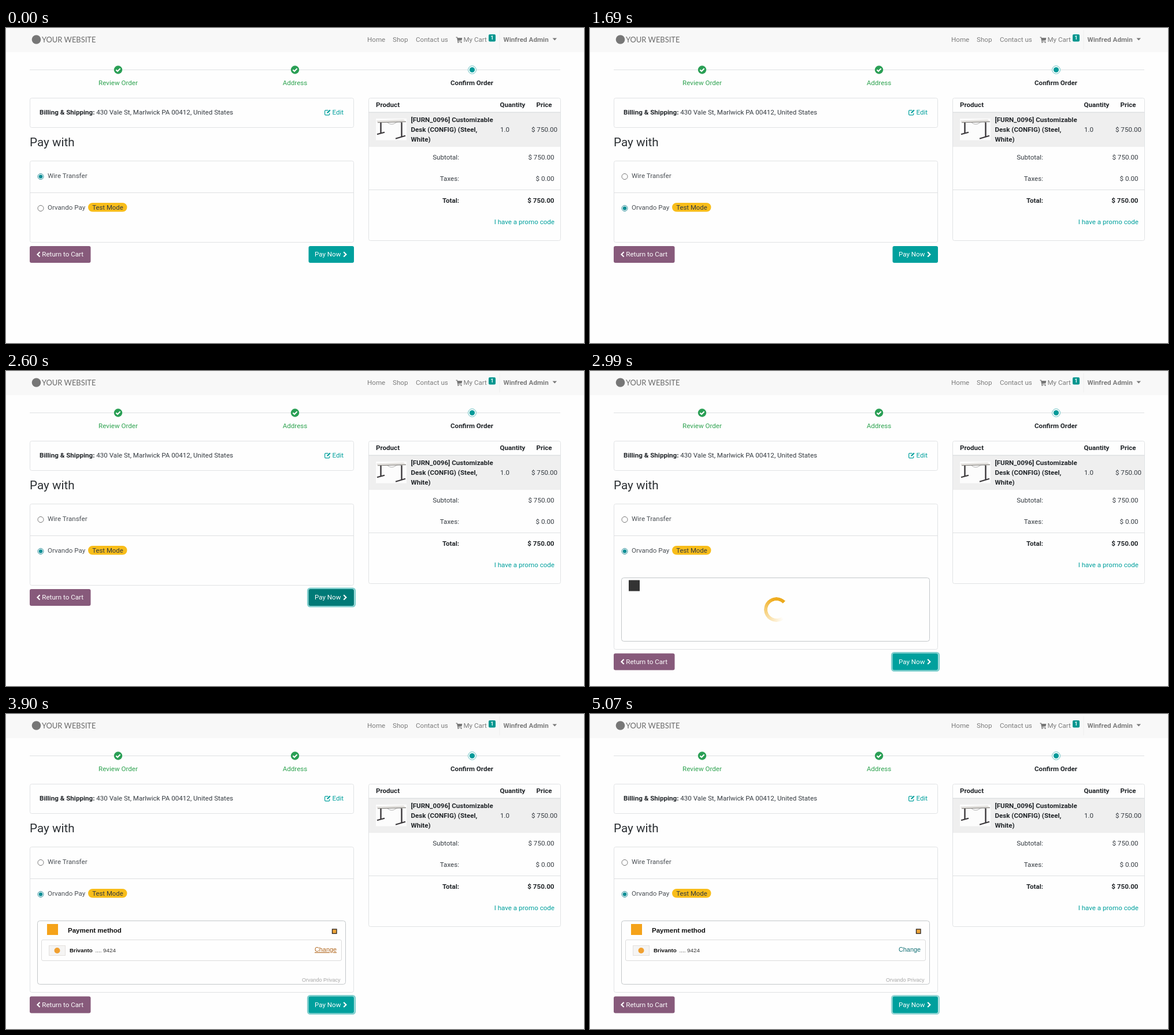
Animation, 1000 px wide and 546 px high, one loop 5.2 s. Source, as an HTML page:

```html
<!DOCTYPE html>
<html lang="en">
<head>
<meta charset="utf-8">
<title>Checkout</title>
<style>
  html, body { margin: 0; width: 100%; height: 100%; overflow: hidden; background: #fefefe; }
  svg { position: absolute; left: 0; top: 0; display: block; }
  text { font: 11.6px Roboto, sans-serif; fill: #343a40; white-space: pre; }
  .b { font-weight: 700; fill: #212529; }
  .nav text { fill: #7c7c7c; }
  .nav .user { font-weight: 700; font-size: 11.7px; }
  .nav .brand { font: 12.9px Lato, sans-serif; fill: #6a6a6a; }
  .nav .count { font-size: 8.6px; font-weight: 700; fill: #fff; }
  .mid { text-anchor: middle; }
  .end { text-anchor: end; }
  .teal { fill: #00a09d; }
  .done { fill: #2ea350; }
  .method { fill: #4a4f54; }
  .white { fill: #fff; }
  .title { font-size: 20.7px; fill: #2b2f33; }
  .card { fill: #fefefe; stroke: #e0e2e4; }
  .rule { stroke: #dee0e2; fill: none; }
  .wallet text { font: 9.8px "Liberation Sans", Arial, sans-serif; fill: #333; }
  .wallet .head { font-size: 11.54px; font-weight: 700; fill: #111; }
  .wallet .name { font-weight: 700; fill: #111; }
  .wallet .note { font-size: 9px; fill: #a6a6a6; }
  .wallet .link { font-size: 10.85px; fill: #127075; }
  .wallet .link.hover { fill: #b0651c; text-decoration: underline; }
  .radio circle { fill: #fff; stroke: #767676; }
  .radio .dot { display: none; stroke: none; fill: #0b8d94; }
  .radio.on circle:first-child { stroke: #2b8d99; }
  .radio.on .dot { display: block; }
  .off { display: none; }
  #spin {
    width: 43px; height: 43px; border-radius: 50%;
    background: conic-gradient(from var(--a), transparent 0 27%, #fdf1d8 36%, #f6cf78 62%, #f0ad20 82%, #eba91c);
    -webkit-mask: radial-gradient(circle, transparent 15.2px, #000 15.8px);
    mask: radial-gradient(circle, transparent 15.2px, #000 15.8px);
  }
</style>
</head>
<body>
<svg width="1000" height="546" viewBox="0 0 1000 546">
  <defs>
    <g id="tick">
      <circle r="7.2" fill="#2a9f55"/>
      <path d="M-3.6 0 L-1 2.6 L3.6 -2.2" fill="none" stroke="#fff" stroke-width="2.1"/>
    </g>
  </defs>

  <g class="nav">
    <rect width="1000" height="41.5" fill="#f8f8f8"/>
    <circle cx="52.5" cy="20" r="7.8" fill="#777"/>
    <text class="brand" x="62" y="24.6">YOUR WEBSITE</text>
    <text x="625" y="24">Home</text>
    <text x="669" y="24">Shop</text>
    <text x="709" y="24">Contact us</text>
    <g fill="#777">
      <path d="M778.5 15.5 h2.4 l.4 1.4 h8 l-.8 4.6 -6.4 .7 .2 1 h6.2 v1.1 h-7.3 l.1-1.2 -1.3-6.4 h-1.5z"/>
      <circle cx="782.3" cy="25" r="1"/><circle cx="787.6" cy="25" r="1"/>
    </g>
    <text x="791.5" y="24">My Cart</text>
    <rect x="835" y="11" width="12" height="12.5" rx="2" fill="#00968f"/>
    <text class="count mid" x="841" y="20.3">1</text>
    <path class="rule" d="M854 4 V37" style="stroke:#eee"/>
    <text class="user" x="860.5" y="24">Winfred Admin</text>
    <path d="M945.5 17.5 h7.5 l-3.75 3.9z" fill="#777"/>
  </g>

  <path class="rule" d="M41 72.5 H959"/>
  <use href="#tick" x="194" y="72.5"/>
  <use href="#tick" x="500" y="72.5"/>
  <circle cx="806.5" cy="72.5" r="6.9" fill="#fff" stroke="#62bfc0"/>
  <circle cx="806.5" cy="72.5" r="4.6" fill="#009a99"/>
  <text class="mid done" x="194" y="99">Review Order</text>
  <text class="mid done" x="500" y="99">Address</text>
  <text class="mid b" x="806" y="99">Confirm Order</text>

  <rect class="card" x="41.5" y="121.5" width="560" height="51" rx="3"/>
  <text x="58" y="150"><tspan class="b">Billing &amp; Shipping:</tspan> 430 Vale St, Marlwick PA 00412, United States</text>
  <g fill="none" stroke="#00a09d" stroke-width="1.2">
    <path d="M557.5 142.6 h-4.3 q-1.6 0 -1.6 1.6 v5 q0 1.6 1.6 1.6 h5 q1.6 0 1.6-1.6 v-1.8"/>
    <path d="M555.8 147.2 L560.8 142.2" stroke-width="2.3"/>
  </g>
  <text class="teal" x="564.5" y="150">Edit</text>

  <text class="title" x="41" y="205">Pay with</text>
  <rect class="card" id="list" x="41.5" y="230.5" width="560" height="141" rx="3"/>
  <path class="rule" d="M41 285.5 H602"/>
  <g class="radio" id="wire" transform="translate(60 257.5)"><circle r="5"/><circle class="dot" r="3.3"/></g>
  <text class="method" x="72" y="260">Wire Transfer</text>
  <g class="radio" id="online" transform="translate(60 312.5)"><circle r="5"/><circle class="dot" r="3.3"/></g>
  <text class="method" x="72" y="315">Orvando Pay</text>
  <rect x="142" y="303" width="67.5" height="15.5" rx="7.7" fill="#f8bd1a"/>
  <text class="mid" x="176" y="315" style="font-size:11.4px">Test Mode</text>

  <g class="wallet" id="wallet">
    <rect x="54.5" y="358.5" width="533" height="110" rx="4" fill="#fefefe" stroke="#c3c7c9"/>
    <g id="loading">
      <rect x="67" y="362.5" width="19" height="19" fill="#333"/>
      <foreignObject x="301" y="392" width="43" height="43"><div id="spin"></div></foreignObject>
    </g>
    <g id="form">
      <rect x="71" y="364" width="19" height="19" fill="#f5a31a"/>
      <text class="head" x="107" y="379">Payment method</text>
      <rect x="564.5" y="373" width="7.5" height="7.5" fill="#eda53a" stroke="#2b2420" stroke-width="1.3"/>
      <rect x="61.5" y="391.5" width="519" height="36" rx="2.5" fill="#fefefe" stroke="#dcdcdc"/>
      <rect x="74.5" y="401.5" width="28" height="17" fill="#f5f4f3" stroke="#e3e0dd"/>
      <circle cx="88.5" cy="410" r="5" fill="#f0a030"/>
      <text class="name" x="110" y="413">Brivanto</text>
      <text x="154.5" y="413">.... 9424</text>
      <text class="link end" id="change" x="572" y="412">Change</text>
      <text class="note end" x="578.5" y="463.5">Orvando Privacy</text>
    </g>
  </g>

  <g id="actions">
    <rect x="41" y="378" width="105.5" height="29" rx="3" fill="#875a7b"/>
    <path d="M58.6 388.2 L54.4 392.4 L58.6 396.6" fill="none" stroke="#fff" stroke-width="2.1"/>
    <text class="white" x="62.3" y="396.3">Return to Cart</text>
    <rect id="ring" x="522.2" y="376.7" width="81.6" height="31.6" rx="4" fill="none" stroke="#80cfce" stroke-width="2.6"/>
    <rect id="pay" x="523.5" y="378" width="78.5" height="29" rx="3"/>
    <text class="white" x="534" y="396.3">Pay Now</text>
    <path d="M584.2 388.2 L588.4 392.4 L584.2 396.6" fill="none" stroke="#fff" stroke-width="2.1"/>
  </g>

  <rect class="card" x="627.5" y="121.5" width="332" height="247" rx="3"/>
  <rect x="628" y="147" width="331" height="59" fill="#efefef"/>
  <path class="rule" d="M627 146.3 H959" stroke-width="1.6"/>
  <path class="rule" d="M627 280.5 H959"/>
  <text class="b" x="640" y="137">Product</text>
  <text class="b" x="854.5" y="137">Quantity</text>
  <text class="b" x="917.5" y="137">Price</text>
  <rect x="640" y="157" width="53" height="37.5" fill="#fcfcfc"/>
  <path d="M641 160.5 L688 158.5 L692 162.5 L643 163.8z" fill="#e4e2df"/>
  <path d="M643 163.8 L692 162.5" stroke="#77746f" fill="none"/>
  <path d="M660 164 q7 5 13 1 t11 -1" stroke="#999" stroke-width=".8" fill="none"/>
  <g fill="none" stroke="#3b383b">
    <path d="M648.5 164 V182 M684.5 163.5 V188" stroke-width="2.4"/>
    <path d="M642 184.3 L655 180.8 M674 191.8 L691 186.8" stroke-width="2"/>
  </g>
  <text class="b" x="700.5" y="163">[FURN_0096] Customizable</text>
  <text class="b" x="700.5" y="180">Desk (CONFIG) (Steel,</text>
  <text class="b" x="700.5" y="197">White)</text>
  <text x="855" y="180">1.0</text>
  <text class="end" x="954" y="180">$ 750.00</text>
  <text class="end" x="784" y="228">Subtotal:</text>
  <text class="end" x="948.5" y="228">$ 750.00</text>
  <text class="end" x="784" y="265">Taxes:</text>
  <text class="end" x="948.5" y="265">$ 0.00</text>
  <text class="end b" x="784" y="303">Total:</text>
  <text class="end b" x="948.5" y="303">$ 750.00</text>
  <text class="end teal" x="949" y="340">I have a promo code</text>
</svg>
<script>
  const LOOP = 5200, TICK = 130, TURN = 1040;
  const TEAL = '#00a09d', HALF = '#008d8a', DARK = '#007a77';

  // Each step changes part of the state from its time on.
  const steps = [
    [0, { online: false, pay: TEAL, ring: 0, open: false, view: '', hover: false }],
    [1430, { online: true }],
    [2210, { pay: HALF }],
    [2340, { pay: DARK, ring: 1 }],
    [2730, { open: true, pay: HALF }],
    [2860, { pay: TEAL, view: 'loading' }],
    [3640, { view: 'form', hover: true }],
    [4160, { hover: false }],
    [4290, { pay: HALF }],
    [4420, { pay: DARK }],
    [4810, { pay: TEAL }],
    [5070, { ring: 0.8 }]
  ];

  const el = id => document.getElementById(id);
  const show = (id, on) => el(id).classList.toggle('off', !on);

  function draw(t) {
    const s = Object.assign({}, ...steps.filter(([at]) => at <= t).map(([, change]) => change));
    el('wire').classList.toggle('on', !s.online);
    el('online').classList.toggle('on', s.online);
    el('pay').setAttribute('fill', s.pay);
    el('ring').setAttribute('opacity', s.ring);
    el('list').setAttribute('height', s.open ? 252 : 141);
    el('actions').setAttribute('transform', `translate(0 ${s.open ? 111.5 : 0})`);
    show('wallet', s.open);
    show('loading', s.view === 'loading');
    show('form', s.view === 'form');
    el('change').classList.toggle('hover', s.hover);
    const held = Math.floor(t / TICK) * TICK;
    el('spin').style.setProperty('--a', 45 + (held - 2990) / TURN * 360 + 'deg');
  }

  const start = performance.now();
  function frame() {
    draw((performance.now() - start) % LOOP);
    requestAnimationFrame(frame);
  }
  frame();
</script>
</body>
</html>
```
